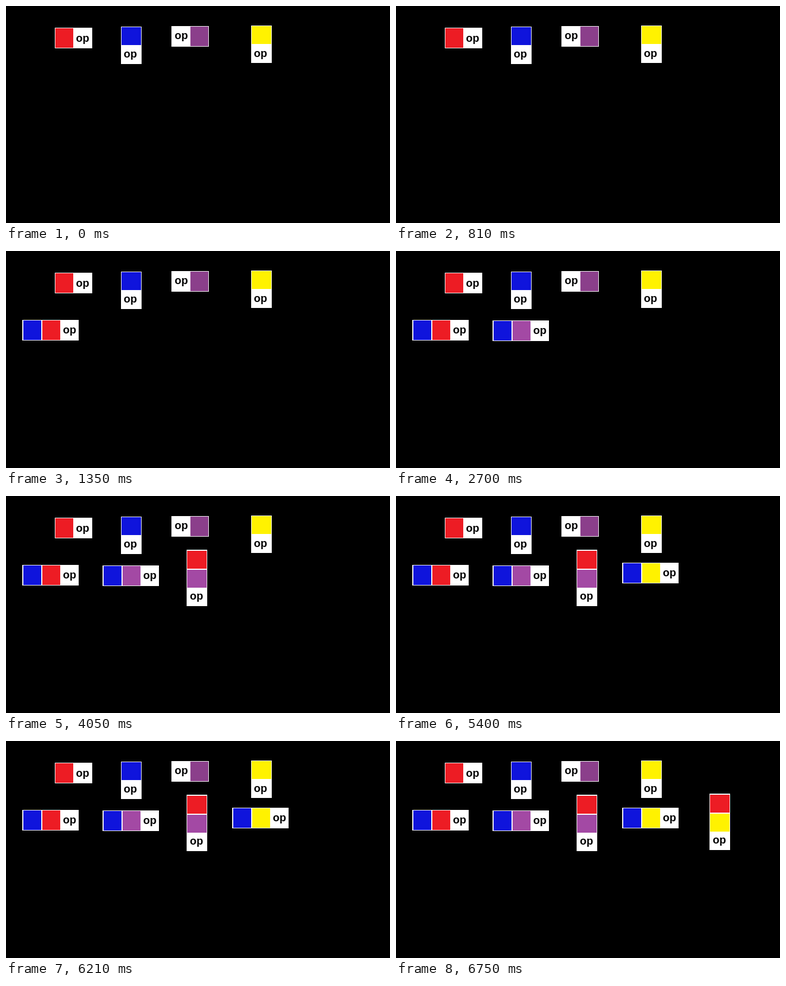
Recreate the animation shown at these times as an HTML page. Size 708x400 px, loop 8000 ms.

```html
<!DOCTYPE html>
<html lang="en">
<head>
<meta charset="utf-8">
<style>
  html, body { margin: 0; width: 100%; height: 100%; overflow: hidden; background: #000; }
  svg { display: block; width: 100vw; height: 100vh; }
  text { font: bold 20px "Liberation Sans", Arial, sans-serif; fill: #000; }
</style>
</head>
<body>
<svg id="stage" viewBox="0 0 708 400" shape-rendering="crispEdges"></svg>
<script>
const LOOP = 8000, STEP = 1350;
const RED = '#ed1c24', BLUE = '#0f14dc', YELLOW = '#fff200', PLUM = '#8b3f8b', PURPLE = '#a349a4';
const stage = document.getElementById('stage');

function add(parent, tag, attrs) {
  const el = document.createElementNS('http://www.w3.org/2000/svg', tag);
  for (const key in attrs) el.setAttribute(key, attrs[key]);
  return parent.appendChild(el);
}

// A white card with coloured cells along its long side and an "op" label.
function card({ step = 0, x, y, colors, down = false, start, label }) {
  const long = 34 + 35 * colors.length;
  const g = add(stage, 'g', { transform: `translate(${x} ${y})` });
  const box = (at, side, len, depth, fill) => add(g, 'rect', down
    ? { x: side, y: at, width: depth, height: len, fill }
    : { x: at, y: side, width: len, height: depth, fill });
  box(0, 0, long, 38, '#fff');
  colors.forEach((c, i) => box(start + 35 * i, 1, 33, 36, c));
  add(g, 'text', { x: label[0], y: label[1] }).textContent = 'op';
  return { g, from: step * STEP };
}

const cards = [
  { x: 90, y: 40, colors: [RED], start: 1, label: [39, 26] },
  { x: 212, y: 38, colors: [BLUE], down: true, start: 1, label: [5, 57] },
  { x: 305, y: 37, colors: [PLUM], start: 35, label: [6, 24] },
  { x: 452, y: 36, colors: [YELLOW], down: true, start: 1, label: [5, 58] },
  { step: 1, x: 30, y: 127, colors: [BLUE, RED], start: 2, label: [75, 25] },
  { step: 2, x: 178, y: 128, colors: [BLUE, PURPLE], start: 2, label: [75, 25] },
  { step: 3, x: 333, y: 99, colors: [RED, PURPLE], down: true, start: 2, label: [6, 92] },
  { step: 4, x: 417, y: 123, colors: [BLUE, YELLOW], start: 2, label: [75, 25] },
  { step: 5, x: 578, y: 97, colors: [RED, YELLOW], down: true, start: 2, label: [6, 92] }
].map(card);

const t0 = performance.now();
function draw() {
  const t = (performance.now() - t0) % LOOP;
  for (const { g, from } of cards) g.style.display = t >= from ? '' : 'none';
  requestAnimationFrame(draw);
}
draw();
</script>
</body>
</html>
```
